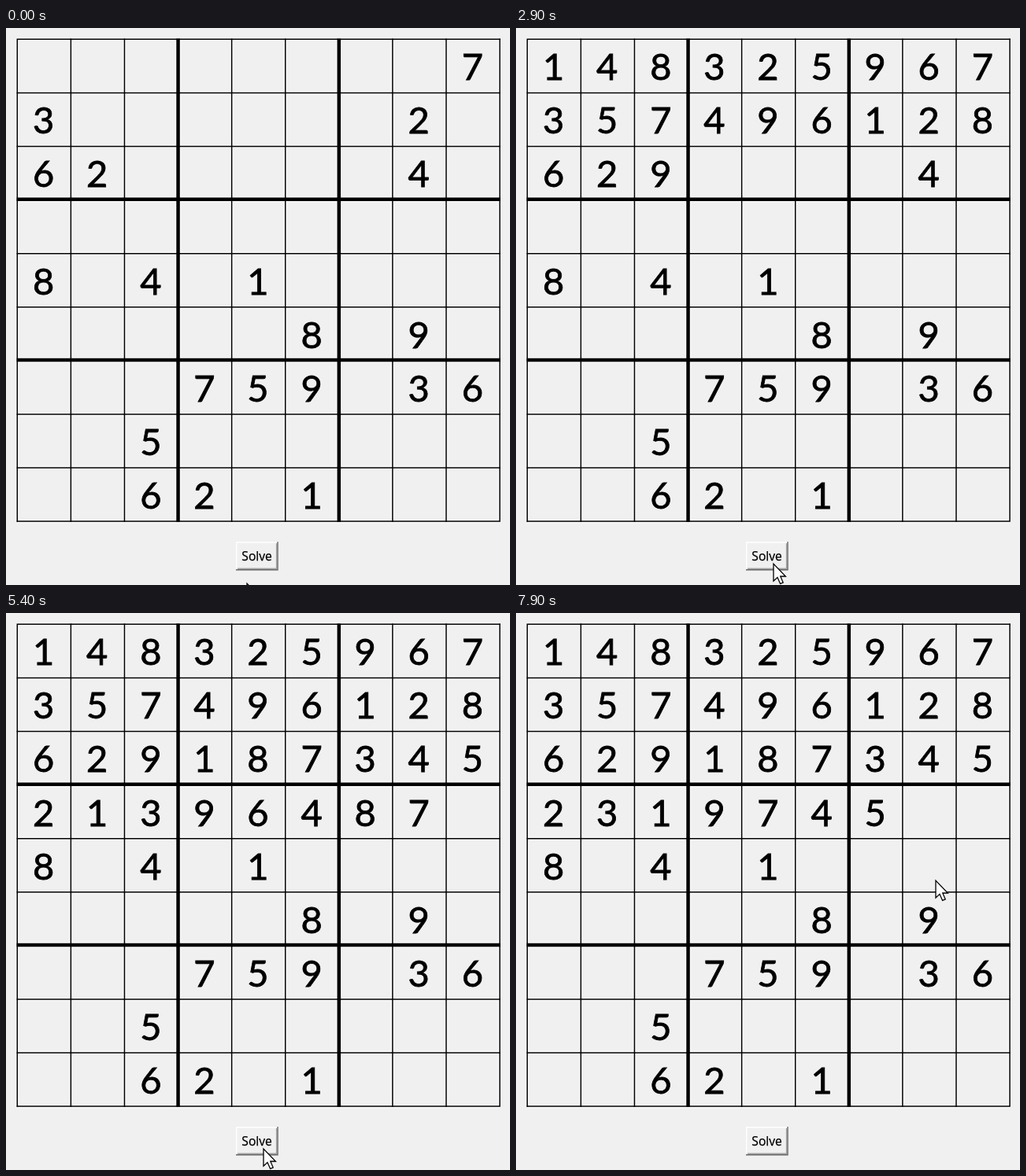
Write an HTML page that moves like this. It is 640 px wide and 708 px high and loops after 8000 ms.

```html
<!DOCTYPE html>
<html lang="en">
<head>
<meta charset="utf-8">
<title>Sudoku solver</title>
<style>
  html, body { margin: 0; width: 100%; height: 100%; overflow: hidden; background: #f0f0f0; }
  svg { display: block; width: 100vw; height: 100vh; }
  .digit { font: 47px Lato, Carlito, sans-serif; text-anchor: middle; stroke: #000; stroke-width: .8; }
  .label { font: 15.6px "Open Sans", "Noto Sans", sans-serif; text-anchor: middle; stroke: #000; stroke-width: .25; }
</style>
</head>
<body>
<svg id="stage" viewBox="0 0 640 708">
  <rect width="640" height="708" fill="#f0f0f0"/>
  <g id="halo" stroke="#f8f8f8" fill="none"></g>
  <g id="lines" stroke="#000" fill="none"></g>
  <g id="digits"></g>
  <g id="button">
    <rect x="292" y="653" width="54" height="37" fill="#f0f0f0"/>
    <path d="M292.7 689V653.7H345" fill="none" stroke="#fff" stroke-width="1.4"/>
    <path d="M294 687.3H343.6V655" fill="none" stroke="#a0a0a0" stroke-width="1.4"/>
    <path d="M292 688.7H345V653" fill="none" stroke="#696969" stroke-width="1.4"/>
    <text class="label" x="318.6" y="677">Solve</text>
  </g>
  <path id="cursor" d="M0 0V22L5 17.3L8.6 25.4L12.2 23.8L8.8 16H15.4Z"
        fill="#fff" stroke="#000" stroke-width="1.3" stroke-linejoin="miter"/>
</svg>
<script>
const LOOP = 8000, TICK = 100;
// The window is shown enlarged; its cells are 50 units wide.
const SCALE = 640 / 470, CELL = 50 * SCALE, EDGE = 10.5 * SCALE;
const PUZZLE = [
  '........7', '3......2.', '62.....4.',
  '.........', '8.4.1....', '.....8.9.',
  '...759.36', '..5......', '..62.1...'
].join('');

// [time, solver steps done]
const PACE = [[1340, 0], [1600, 9], [2900, 56], [4700, 108], [6100, 150], [7000, 182], [7900, 226]];
// [time, x, y]
const POINTER = [
  [0, 306, 706], [700, 327, 681], [5500, 327, 681], [6100, 580, 54.5], [6300, 573, 7],
  [6600, 556, 3], [7000, 546.5, 14.5], [7200, 545, 40], [7900, 533, 340]
];

const byId = id => document.getElementById(id);

function add(parent, tag, attrs) {
  const node = document.createElementNS('http://www.w3.org/2000/svg', tag);
  for (const key in attrs) node.setAttribute(key, attrs[key]);
  return parent.appendChild(node);
}

function sample(keys, t) {
  if (t <= keys[0][0]) return keys[0].slice(1);
  const next = keys.findIndex(key => key[0] > t);
  if (next < 0) return keys[keys.length - 1].slice(1);
  const a = keys[next - 1], b = keys[next];
  const u = (t - a[0]) / (b[0] - a[0]);
  return a.slice(1).map((v, i) => v + (b[i + 1] - v) * u);
}

function fits(board, cell, value) {
  const row = Math.floor(cell / 9), col = cell % 9;
  return board.every((other, i) => {
    if (other !== value) return true;
    const r = Math.floor(i / 9), c = i % 9;
    const sameBox = Math.floor(r / 3) === Math.floor(row / 3) && Math.floor(c / 3) === Math.floor(col / 3);
    return r !== row && c !== col && !sameBox;
  });
}

// Backtracking search that yields the board after every placing and clearing.
function* solve(board) {
  const cell = board.indexOf('.');
  if (cell < 0) return true;
  for (const value of '123456789') {
    if (!fits(board, cell, value)) continue;
    board[cell] = value;
    yield board.join('');
    if (yield* solve(board)) return true;
    board[cell] = '.';
    yield board.join('');
  }
  return false;
}

const boards = [PUZZLE];
const search = solve([...PUZZLE]);
while (boards.length < 240) boards.push(search.next().value);

for (let i = 0; i < 10; i++) {
  const thick = i === 3 || i === 6;
  const at = EDGE + CELL * i, end = EDGE + CELL * 9;
  const width = thick ? 4.5 : 1.5;
  const y = thick ? at - .7 : at;
  const d = `M${at} ${EDGE - .7}V${end + .7}M${EDGE - .7} ${y}H${end + .7}`;
  add(byId('halo'), 'path', { d, 'stroke-width': width + 3 });
  add(byId('lines'), 'path', { d, 'stroke-width': width });
}

const cells = [...PUZZLE].map((_, i) => add(byId('digits'), 'text', {
  class: 'digit',
  x: 47.6 + CELL * (i % 9),
  y: 66.3 + CELL * Math.floor(i / 9)
}));

function draw(time) {
  const t = Math.floor(time / TICK) * TICK;
  const step = Math.floor(sample(PACE, t)[0] + 1e-6);
  cells.forEach((cell, i) => {
    const value = boards[step][i];
    const text = value === '.' ? '' : value;
    if (cell.textContent !== text) cell.textContent = text;
  });
  const [x, y] = sample(POINTER, t);
  byId('cursor').setAttribute('transform', `translate(${x} ${y})`);
}

const start = performance.now();
function frame() {
  draw((performance.now() - start) % LOOP);
  requestAnimationFrame(frame);
}
frame();
</script>
</body>
</html>
```
